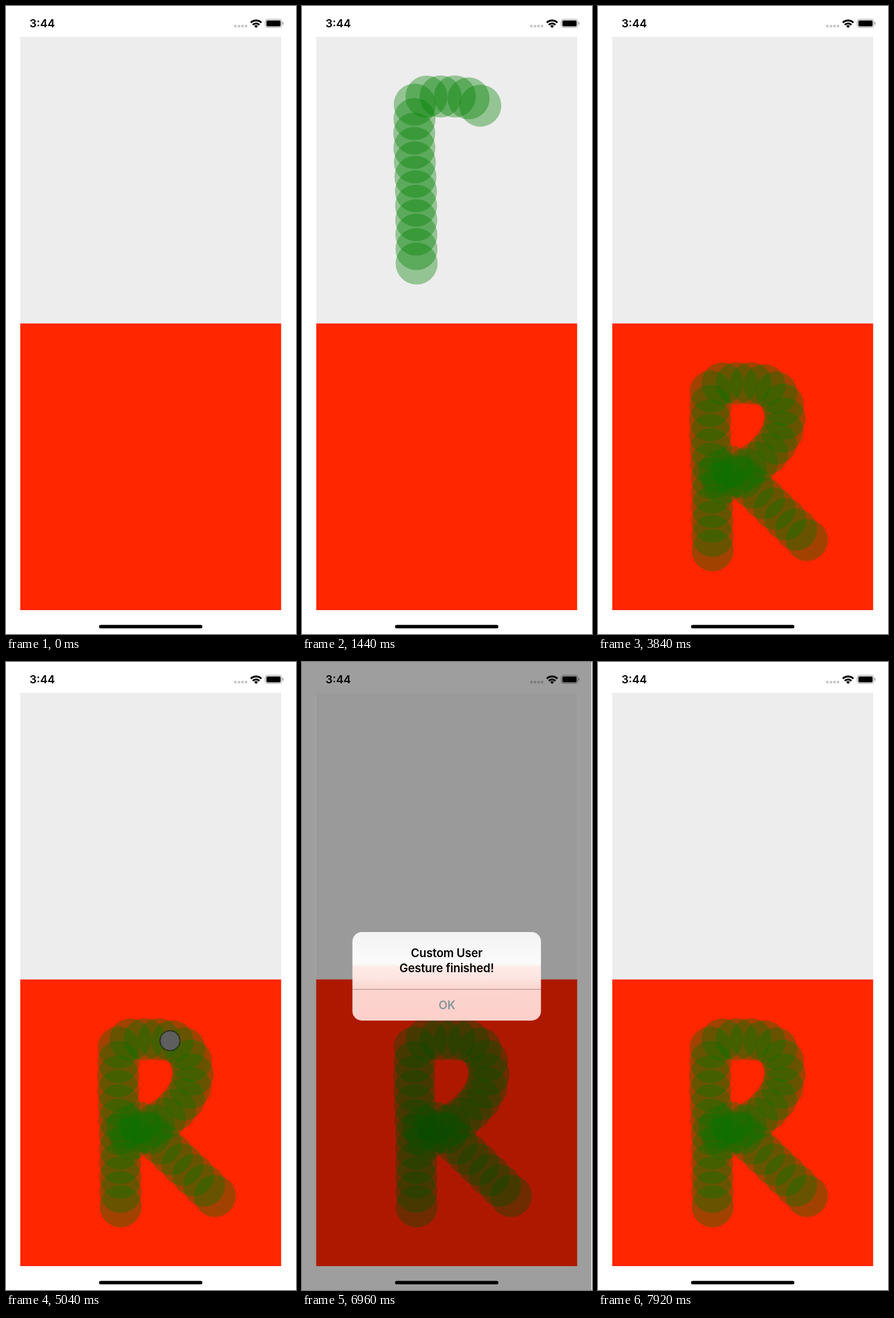
Recreate the animation shown at these times as an HTML page. Size 463x1000 px, loop 8000 ms.

```html
<!DOCTYPE html>
<html lang="en">
<head>
<meta charset="utf-8">
<title>Gesture drawing</title>
<style>
  html, body { margin: 0; width: 100%; height: 100%; overflow: hidden; background: #fff; }
  svg { position: absolute; left: 0; top: 0; }
  text { font-family: Inter, Roboto, sans-serif; font-weight: 600; }
  .loop, .dot, .dim, #alert, #marker { animation: 8s linear infinite; }

  .dot { fill: #008000; opacity: 0; animation-name: dot; }
  #sketch { animation-name: sketch; }
  #copy { animation-name: copy; }
  .dim { opacity: 0; animation-name: fade; }
  #alert {
    --fade-out: cubic-bezier(.33, .1, .33, 1);
    opacity: 0; transform-origin: 231px 500.5px; animation-name: fade, shrink;
  }
  #alert text { font-size: 18.5px; letter-spacing: -.15px; text-anchor: middle; }
  #lower { position: absolute; left: 0; top: 456.7px; }
  #marker {
    position: absolute; left: 0; top: 0; width: 33px; height: 33px;
    box-sizing: border-box; border: 1.6px solid #000; border-radius: 50%;
    background: #5e5e5e; opacity: 0;
    offset-rotate: 0deg; offset-anchor: center;
    animation-name: travel, tracing;
  }

  @keyframes dot { 0%, 50% { opacity: .38; } 50.01%, 100% { opacity: 0; } }
  @keyframes sketch { 0%, 47.94% { opacity: 1; } 47.95%, 100% { opacity: 0; } }
  @keyframes copy { 0%, 47.94% { opacity: 0; } 47.95%, 100% { opacity: 1; } }
  @keyframes travel {
    0%, 50% { offset-distance: 0%; }
    78%, 100% { offset-distance: calc(100% - 38px); }
  }
  @keyframes tracing {
    0%, 49.94% { opacity: 0; }
    49.95%, 78.94% { opacity: 1; }
    78.95%, 100% { opacity: 0; }
  }
  @keyframes fade {
    0% { opacity: 0; }
    77.5% { opacity: 0; animation-timing-function: ease; }
    83% { opacity: 1; }
    88.5% { opacity: 1; animation-timing-function: var(--fade-out, ease); }
    94%, 100% { opacity: 0; }
  }
  @keyframes shrink {
    0%, 77.5% { transform: scale(1.2); animation-timing-function: ease; }
    83%, 100% { transform: scale(1); }
  }
</style>
</head>
<body>
<svg width="463" height="1000" viewBox="0 0 463 1000">
  <defs>
    <linearGradient id="glass" gradientUnits="userSpaceOnUse" x1="0" y1="430" x2="0" y2="571">
      <stop offset="0" stop-color="#f3f3f3"/>
      <stop offset=".35" stop-color="#fcfbfb"/>
      <stop offset=".4" stop-color="#feeae7"/>
      <stop offset=".53" stop-color="#fde4e0"/>
      <stop offset=".64" stop-color="#fcd4ce"/>
      <stop offset="1" stop-color="#fcd0c9"/>
    </linearGradient>
  </defs>

  <path d="M366.3 32h17" stroke="#c8c8c8" stroke-width="4.4" stroke-linecap="round" stroke-dasharray="0 5.63"/>
  <rect class="dim" width="462" height="1000" fill-opacity=".38"/>

  <text x="37.5" y="34.2" font-size="17.8">3:44</text>
  <g fill="none" stroke="#000" stroke-width="2.9">
    <path d="M390.8 26.6A12 12 0 0 1 407.8 26.6"/>
    <path d="M394 30A7.4 7.4 0 0 1 404.6 30"/>
  </g>
  <path d="M396.2 31.8A4.6 4.6 0 0 1 402.4 31.8L399.3 34.9Z"/>
  <rect x="413.9" y="21.3" width="26.4" height="12.8" rx="3.6" fill="none" stroke="#000" stroke-opacity=".42"/>
  <rect x="415.7" y="23" width="22.8" height="9.4" rx="2.2"/>
  <path d="M441.6 25.6A2.3 2.3 0 0 1 441.6 29.8Z" fill-opacity=".5"/>

  <rect x="22.7" y="49" width="416.6" height="456.5" fill="#ededed"/>
  <rect class="dim" x="22.7" y="49" width="416.6" height="456.5" fill-opacity=".35"/>
  <g id="sketch" class="loop"></g>

  <rect x="22.7" y="505.5" width="416.6" height="456.5" fill="#ff2600"/>
  <g id="copy" class="loop" transform="translate(0 456.7)" fill="#0c7200" fill-opacity=".38"></g>
  <rect class="dim" x="22.7" y="505.5" width="416.6" height="456.5" fill-opacity=".32"/>

  <rect x="148.5" y="985.5" width="165" height="5.6" rx="2.8"/>

  <g id="alert">
    <rect x="80.5" y="430" width="301" height="141" rx="15" fill="url(#glass)"/>
    <path d="M80.5 521.3H381.5" stroke="#3c3c43" stroke-opacity=".45"/>
    <text x="231" y="470">Custom User</text>
    <text x="231" y="494.3">Gesture finished!</text>
    <text x="231.4" y="553" fill="#87969b">OK</text>
  </g>
</svg>
<div id="lower"><div id="marker"></div></div>
<script>
  const SVG = 'http://www.w3.org/2000/svg', TICK = 80;
  const get = id => document.getElementById(id);

  // The letter as one line: each part and how many evenly spaced dots it takes.
  const parts = [
    { d: 'L182 296L179 215L180 157', dots: 11 },
    { d: 'L199 144H244', dots: 3 },
    { d: 'C280 144 298 164 298 200', dots: 4 },
    { d: 'C298 226 280 250 254 270', dots: 4 },
    { d: 'L200 302', dots: 3 },
    { d: 'L192 285L213 277', dots: 2 },
    { d: 'L333.5 393.5', dots: 7 }
  ];

  // The finger moves in bursts, with a pause between them.
  const bursts = [
    { start: 80, gap: 64, dots: 11 },
    { start: 1040, gap: 80, dots: 12 },
    { start: 2000, gap: 20, dots: 3 },
    { start: 2160, gap: 70, dots: 8 },
    { start: 2960, gap: 0, dots: 1 }
  ];

  function addDot(parent, { x, y }) {
    const dot = document.createElementNS(SVG, 'circle');
    dot.setAttribute('cx', x);
    dot.setAttribute('cy', y);
    dot.setAttribute('r', 33.5);
    return parent.appendChild(dot);
  }

  const line = document.createElementNS(SVG, 'path');
  let d = 'M183 410', length = 0;
  const points = [{ x: 183, y: 410 }];
  for (const part of parts) {
    line.setAttribute('d', d += part.d);
    const step = (line.getTotalLength() - length) / part.dots;
    for (let i = 1; i <= part.dots; i++) points.push(line.getPointAtLength(length + i * step));
    length += step * part.dots;
  }

  const times = bursts.flatMap(({ start, gap, dots }) =>
    Array.from({ length: dots }, (_, i) => Math.floor((start + i * gap) / TICK) * TICK));

  points.forEach((point, i) => {
    const dot = addDot(get('sketch'), point);
    dot.classList.add('dot');
    dot.style.animationDelay = `${times[i] - 4}ms`;
    addDot(get('copy'), point);
  });

  get('marker').style.offsetPath = `path("${d}")`;
</script>
</body>
</html>
```
